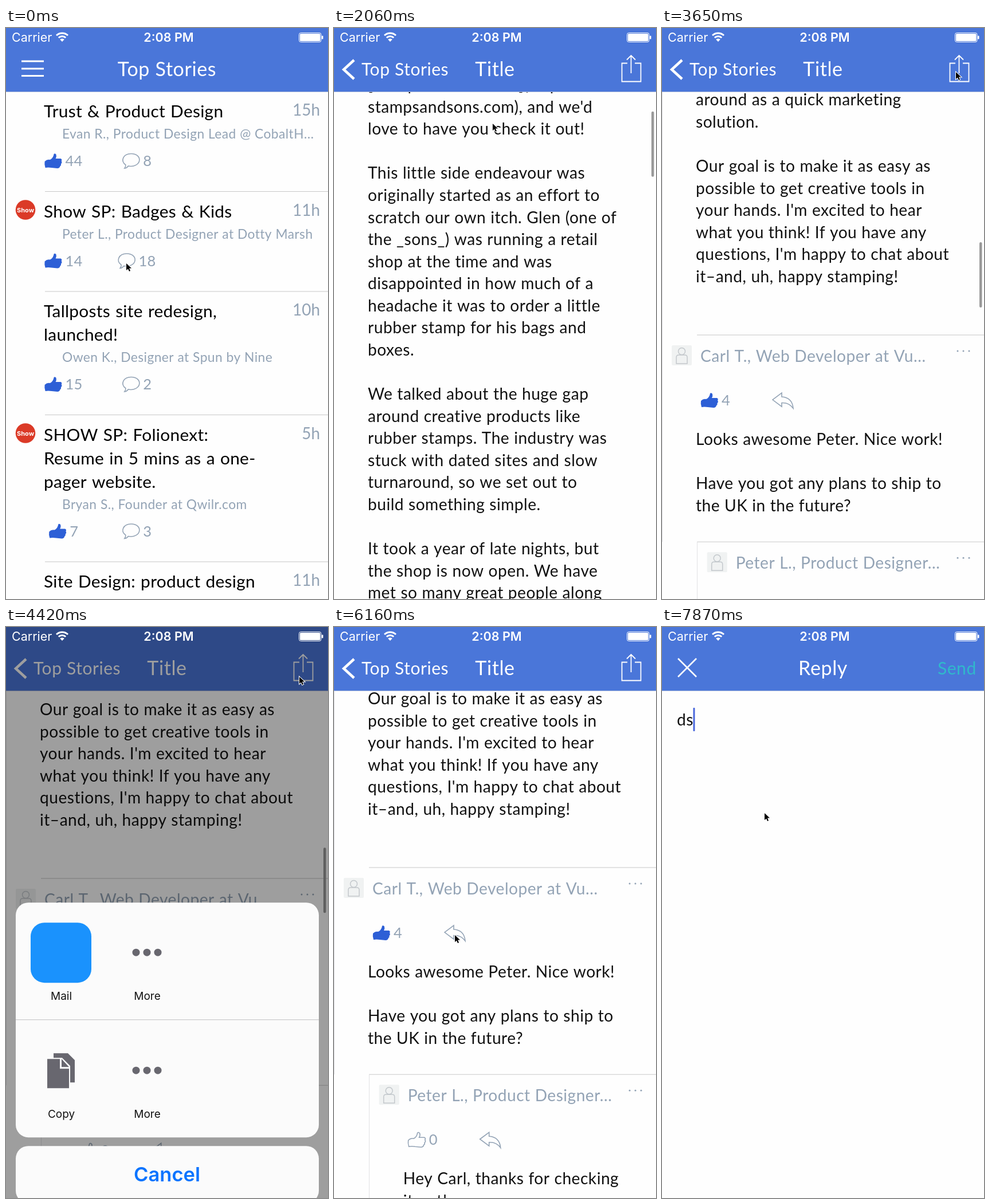
Animation, 562 px wide and 997 px high, one loop 7990 ms. Source, as an HTML page with a canvas:

```html
<!DOCTYPE html>
<html lang="en">
<head>
<meta charset="utf-8">
<title>Story reader</title>
<style>
  html, body { margin: 0; width: 100%; height: 100%; overflow: hidden; background: #fefefe; }
  canvas { display: block; width: 100%; height: 100%; }
</style>
</head>
<body>
<canvas id="stage" width="562" height="997"></canvas>
<script>
const W = 562, H = 997, LOOP = 7990;
const ctx = document.getElementById('stage').getContext('2d');

const BLUE = '#4a76d9', PAPER = '#fefefe', GRAY = '#93a3b5', LIKE = '#2d5fd6', RULE = '#c8c8c8';
const BODY_PITCH = 38.57, TITLE_PITCH = 41;
const LATO = 'Lato, sans-serif', INTER = 'Inter, sans-serif';

// ---------- content ----------
const stories = [
  { title: ['Trust & Product Design'], time: '15h', by: 'Evan R., Product Design Lead @ CobaltH…', likes: 44, replies: 8 },
  { title: ['Show SP: Badges & Kids'], time: '11h', by: 'Peter L., Product Designer at Dotty Marsh', likes: 14, replies: 18, show: true },
  { title: ['Tallposts site redesign,', 'launched!'], time: '10h', by: 'Owen K., Designer at Spun by Nine', likes: 15, replies: 2 },
  { title: ['SHOW SP: Folionext:', 'Resume in 5 mins as a one-', 'pager website.'], time: '5h', by: 'Bryan S., Founder at Qwilr.com', likes: 7, replies: 3, show: true },
  { title: ['Site Design: product design', 'portfolio'], time: '11h', by: 'Nora F., Designer', likes: 5, replies: 1 }
];

const article = `Hey Sketcher Post, today we're
announcing a new site at
[stampsandsons.com](http:\/\/
stampsandsons.com), and we'd
love to have you check it out!

This little side endeavour was
originally started as an effort to
scratch our own itch. Glen (one of
the _sons_) was running a retail
shop at the time and was
disappointed in how much of a
headache it was to order a little
rubber stamp for his bags and
boxes.

We talked about the huge gap
around creative products like
rubber stamps. The industry was
stuck with dated sites and slow
turnaround, so we set out to
build something simple.

It took a year of late nights, but
the shop is now open. We have
met so many great people along
the way.

Our favourite part has been
seeing what people make, and
being there with them for all
those really important moments in
their lives: they’re starting or
rebranding their business, or
announcing an event like a
wedding. It’s so rewarding to be a
small part of that process.

Have a peek. Let me know if you
have any questions, and we are
certainly open to your feedback
and response. Cheers!`.split('\n');

const comments = [
  { depth: 0, by: 'Peter L., Product Designer at Do…', likes: 1, text: `Hey Sketcher Post, we just
launched a super easy way to make
rubber stamps from any graphic.
Our customers (mostly small biz
owners and entrepreneurs) are
finding it handy to have one
around as a quick marketing
solution.

Our goal is to make it as easy as
possible to get creative tools in
your hands. I'm excited to hear
what you think! If you have any
questions, I'm happy to chat about
it–and, uh, happy stamping!
` },
  { depth: 0, by: 'Carl T., Web Developer at Vu…', likes: 4, liked: true, text: `Looks awesome Peter. Nice work!

Have you got any plans to ship to
the UK in the future?` },
  { depth: 1, by: 'Peter L., Product Designer…', likes: 0, text: `Hey Carl, thanks for checking
it out!` }
];

// ---------- timing ----------
// [start, end, number of picture changes]
const bursts = [
  [180, 300, 2], [690, 1100, 6], [1215, 1450, 3], [1540, 1720, 4], [1890, 2590, 11],
  [2710, 3410, 7], [3530, 3890, 4], [4070, 4420, 5], [4540, 4770, 3], [4890, 5680, 10],
  [5800, 6160, 4], [6340, 7060, 9], [7300, 7460, 3], [7750, 7870, 2]
];
const cursorPath = [
  [0, 210, 411], [180, 208, 408], [300, 210, 411], [610, 210, 411], [1100, 375, 421], [1450, 330, 308],
  [1720, 226, 300], [1890, 250, 280], [2150, 300, 70], [2350, 315, 200], [2590, 321, 360], [2710, 321, 372],
  [2950, 325, 130], [3200, 360, 200], [3410, 450, 150], [3530, 510, 85], [3650, 513, 77], [4070, 513, 80],
  [4420, 512, 87], [4770, 512, 87], [5200, 330, 930], [5330, 318, 950], [5680, 318, 950], [6040, 215, 560],
  [6160, 211, 538], [6340, 211, 538], [7060, 185, 328], [7300, 183, 327], [7460, 179, 325]
];
const scrollPath = [
  [1720, 0], [1890, 60], [2050, 300], [2200, 620], [2400, 1050], [2590, 1310], [2710, 1385], [2830, 1500],
  [2950, 1720], [3060, 1900], [3200, 2056], [3410, 2154], [3530, 2194], [3650, 2225], [3890, 2269],
  [4070, 2280], [4420, 2322], [4770, 2334], [5000, 2341]
];

const clamp = v => Math.max(0, Math.min(1, v));
const ramp = (t, a, b) => clamp((t - a) / (b - a));

function track(keys, t, column = 1) {
  const next = keys.findIndex(k => k[0] > t);
  if (next === 0) return keys[0][column];
  if (next < 0) return keys[keys.length - 1][column];
  const a = keys[next - 1], b = keys[next];
  return a[column] + (b[column] - a[column]) * ramp(t, a[0], b[0]);
}

// Critically damped spring from 0 to 1.
function spring(t, start, rate) {
  const u = Math.max(0, t - start) / 1000 * rate;
  return 1 - (1 + u) * Math.exp(-u);
}

function heldTime(t) {
  let held = 0;
  for (const [start, end, count] of bursts) {
    if (t < start) break;
    const gap = (end - start) / (count - 1);
    held = t >= end ? end : start + Math.floor((t - start) / gap + 1e-6) * gap;
  }
  return held;
}

// ---------- drawing helpers ----------
function text(str, x, y, size, color, { weight = 400, align = 'left', family = LATO, track = .018, word = .01 } = {}) {
  ctx.font = `${weight} ${size}px ${family}`;
  ctx.letterSpacing = track * size + 'px';
  ctx.wordSpacing = word * size + 'px';
  ctx.textAlign = align;
  ctx.fillStyle = color;
  ctx.fillText(str, x, y);
}
const inter = (str, x, y, size, color, weight = 400, align = 'center') =>
  text(str, x, y, size, color, { weight, align, family: INTER, track: 0, word: 0 });

function box(x, y, w, h, color, radius = 0) {
  ctx.fillStyle = color;
  ctx.beginPath();
  ctx.roundRect(x, y, w, h, radius);
  ctx.fill();
}

function dot(x, y, r, color) {
  ctx.fillStyle = color;
  ctx.beginPath();
  ctx.arc(x, y, r, 0, 7);
  ctx.fill();
}

function shifted(x, y, draw, alpha = 1) {
  ctx.save();
  ctx.translate(x, y);
  ctx.globalAlpha *= alpha;
  draw();
  ctx.restore();
}

const shapes = {
  thumb: new Path2D('M0 14Q4 10 9 11L11 10Q15 7 16 1Q18 -1 20 2Q21 6 19 9L28 9Q31 11 29 13Q31 16 28.5 18Q29 21 27 22Q26 26 22 26L12 25Q6 24 1 25Q-1 19 0 14Z'),
  bubble: new Path2D('M10 22Q7 26 3.5 26Q6 23 5.5 20C-4 13 1 .5 15 .5C26 .5 30 7 29.5 12C29 19 20 24 10 22Z'),
  reply: new Path2D('M0 12L16 0V7C30 8 35 16 36 27C31 20 25 17 16 17.5V24Z'),
  person: new Path2D('M23.5 10.5A6 6 0 1 1 11.5 10.5A6 6 0 1 1 23.5 10.5M8 32V21Q8 17 12 17H23Q27 17 27 21V32Z'),
  menu: new Path2D('M27 58H66M27 71H66M27 83.5H66'),
  chevron: new Path2D('M35 56L17 72.5L35 89'),
  share: new Path2D('M512 61.5H502.5V93.5H535.5V61.5H525M518.5 79V48M511 55.5L518.5 48L526 55.5'),
  close: new Path2D('M28 55L60 87M60 55L28 87'),
  cursor: new Path2D('M0 0V12L3 9.5L5 14L7 13L5 8.5H9Z'),
  pages: new Path2D('M83 263H108L120 275V314H112V285L98 271H83ZM72 273H94V290H110V324H72ZM97 273L110 287H97Z')
};

function stroke(shape, color, width, x = 0, y = 0) {
  shifted(x, y, () => {
    ctx.strokeStyle = color;
    ctx.lineWidth = width;
    ctx.stroke(shapes[shape]);
  });
}
function fill(shape, color, x = 0, y = 0) {
  shifted(x, y, () => { ctx.fillStyle = color; ctx.fill(shapes[shape]); });
}

function avatar(x, y, scale = 1) {
  shifted(x, y, () => {
    ctx.scale(scale, scale);
    box(0, 0, 35, 35, '#f0f2f2', 2);
    stroke('person', '#c3c8cc', 1.5);
  });
}

// ---------- screens ----------
function storyRow(story, top, withAvatar) {
  const extra = (story.title.length - 1) * TITLE_PITCH;
  if (story.show) {
    dot(34, top + 32, 17.3, '#db3a27');
    inter('Show', 34, top + 36, 11, '#fff', 700);
  }
  story.title.forEach((line, i) =>
    text(line, 66, top + 45 + i * TITLE_PITCH, 29.85, '#000', { track: .01, word: .04 }));
  text(story.time, 548, top + 42, 28, GRAY, { align: 'right', track: 0 });
  if (withAvatar) avatar(75, top + 66, .5);
  text(story.by, 98, top + 82 + extra, 22.8, GRAY);

  const mid = top + 121 + extra;
  const counter = (n, center, drawIcon) => {
    const x = center - 17 - 7.7 * String(n).length;
    drawIcon(x, mid - 13);
    text(n, x + 36, mid + 9, 25.5, GRAY, { track: 0 });
  };
  counter(story.likes, 100, (x, y) => fill('thumb', LIKE, x, y));
  counter(story.replies, 228, (x, y) => stroke('bubble', GRAY, 1.6, x, y));
  return top + 174.5 + extra;
}

function listScreen() {
  box(0, 0, W, H, PAPER);
  let y = 111;
  stories.forEach((story, i) => {
    if (i) box(68, y - .5, W, 1, RULE);
    y = storyRow(story, y);
  });
}

function paragraph(lines, x, y) {
  lines.forEach((line, i) => text(line, x, y + i * BODY_PITCH, 28.1, '#111'));
}

function commentBlock(comment, top, ruleX) {
  const indent = comment.depth * 61.7, lines = comment.text.split('\n');
  const bottom = top + 182 + (lines.length - 1) * BODY_PITCH + 63.5;
  box(ruleX, top - .5, W, 1, RULE);
  box(comment.depth * 61, top, 1, bottom - top, '#e2e2e4');
  for (const x of [516, 526, 536]) dot(x, top + 28, 1.5, GRAY);
  shifted(indent, top, () => {
    avatar(17, 18);
    text(comment.by, 67, 47, 28.1, GRAY);
    if (comment.liked) fill('thumb', LIKE, 68, 101);
    else stroke('thumb', GRAY, 1.6, 68, 101);
    text(comment.likes, 104, 123, 25.5, GRAY, { track: 0 });
    stroke('reply', GRAY, 1.6, 193, 101);
    paragraph(lines, 59, 192);
  });
  return bottom;
}

function detailScreen(scroll, barAlpha) {
  box(0, 0, W, H, PAPER);
  shifted(0, -scroll, () => {
    storyRow(stories[1], 111, true);
    paragraph(article, 59, 302);
    let y = 1937;
    comments.forEach((comment, i) => { y = commentBlock(comment, y, i ? 61 : 68); });
  });
  shifted(0, 0, () => box(554, 114.3 + scroll * .1167, 4.5, 114, '#999', 2.2), barAlpha);
}

const heading = (str, x) => text(str, x, 84, 34, '#fff', { align: 'center' });

function bar() {
  box(0, 0, W, 111, BLUE);
  box(0, 111, W, 1, '#aebbdc');
}

function navigation(p) {
  bar();
  shifted(0, 0, () => stroke('menu', '#fff', 3), clamp(1 - 2 * p));
  shifted(-158 * p, 0, () => heading('Top Stories', 281), clamp(1 - 1.6 * p));
  shifted(144 * (1 - p), 0, () => text('Top Stories', 48, 83, 30, '#fff'), p ** 6);
  shifted(281 * (1 - p), 0, () => heading('Title', 281), p);
  shifted(0, 0, () => {
    stroke('chevron', '#fff', 4.5);
    stroke('share', '#fff', 1.8);
  }, p);
}

function statusBar() {
  inter('Carrier', 10, 24, 21.5, '#fff', 400, 'left');
  inter('2:08 PM', 284, 24, 21.5, '#fff', 600);
  const up = -Math.PI / 2, spread = .76;
  ctx.strokeStyle = '#fff';
  ctx.lineWidth = 3;
  for (const r of [14.5, 9]) {
    ctx.beginPath();
    ctx.arc(98, 23.5, r, up - spread, up + spread);
    ctx.stroke();
  }
  ctx.fillStyle = '#fff';
  ctx.beginPath();
  ctx.moveTo(98, 24);
  ctx.arc(98, 24, 5.5, up - spread, up + spread);
  ctx.fill();

  ctx.lineWidth = 1;
  ctx.beginPath();
  ctx.roundRect(511.5, 8.5, 38.5, 16, 3);
  ctx.stroke();
  box(513, 10, 35.5, 13, '#fff', 1.5);
  box(551, 13.5, 2.5, 6, '#fff', 1);
}

function shareSheet(p) {
  shifted(0, 455 + 542 * (1 - p), () => {
    const panel = '#fbfbfb', ink = '#68676f';
    box(17, 0, 529, 410, panel, 22);
    box(17, 204, 529, 1, '#bfbfc1');
    box(43, 35, 106, 105, '#1a92fd', 24);
    fill('pages', ink);
    for (const y of [87, 293]) {
      for (const x of [227, 246, 265]) dot(x, y, 6.5, ink);
      inter('More', 246.5, y + 83, 19, '#111');
    }
    inter('Mail', 96.5, 170, 19, '#111');
    inter('Copy', 96.5, 376, 19, '#111');
    box(17, 425, 529, 100, panel, 22);
    inter('Cancel', 281, 487, 34.5, '#0a74ff', 600);
  });
}

function replyScreen(p, typed, caret) {
  shifted(0, H * (1 - p), () => {
    box(0, 0, W, H, PAPER);
    bar();
    stroke('close', '#fff', 2.6);
    heading('Reply', 281);
    text('Send', 481, 83, 30, '#30b9cb');
    text(typed, 26, 172, 28.1, '#111');
    if (caret) box(26 + ctx.measureText(typed).width - (typed ? .5 : 0), 141, 3, 41, '#4a68dc', 1);
  });
}

function render(t) {
  const push = spring(t, 640, 13.1);
  const sheet = spring(t, 4000, 11.4) * (1 - ramp(t, 5330, 5680) ** 1.6);
  const modal = spring(t, 6270, 12);

  const x = W * (1 - push);
  if (push < .999) {
    shifted(-169 * push, 0, listScreen);
    box(0, 0, W, H, `rgba(0,0,0,${.1 * push})`);
  }
  if (push > 0) {
    const barAlpha = ramp(t, 1500, 1620) * (1 - ramp(t, 4900, 5300));
    shifted(x < .6 ? 0 : x, 0, () => detailScreen(track(scrollPath, t), barAlpha));
  }
  navigation(push);

  if (sheet > 0) {
    box(0, 0, W, H, `rgba(0,0,0,${.4 * sheet})`);
    shareSheet(sheet);
  }
  if (modal > 0) {
    const typed = t >= 7870 ? 'ds' : t >= 7750 ? 'd' : '';
    replyScreen(modal > .999 ? 1 : modal, typed, t >= 7300);
  }
  statusBar();

  const cx = track(cursorPath, t, 1), cy = track(cursorPath, t, 2);
  stroke('cursor', '#fff', 2, cx, cy);
  fill('cursor', '#000', cx, cy);
}

function frame() {
  render(heldTime(performance.now() % LOOP));
  requestAnimationFrame(frame);
}
frame();
</script>
</body>
</html>
```
